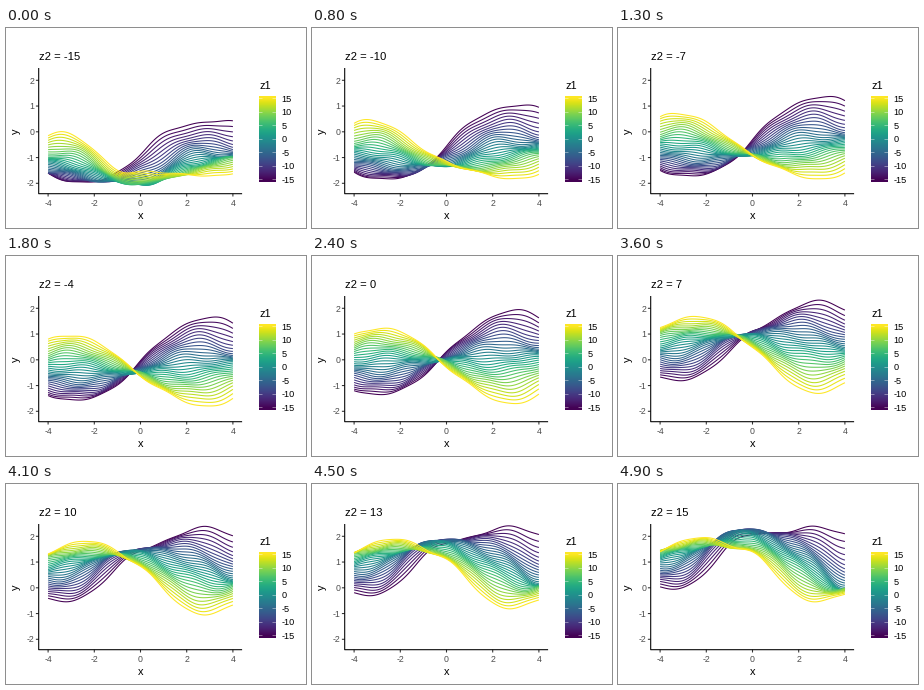
Write a matplotlib script that moves like this. It is 300 by 200 pixels and loops after 5000 ms.

```python
import numpy as np
import matplotlib.pyplot as plt
from matplotlib.animation import FuncAnimation
from matplotlib.collections import LineCollection

plt.rcParams["font.family"] = "Liberation Sans"
W, H, DPI = 300, 200, 100
PX = 72 / DPI  # points per pixel
FRAMES, INTERVAL = 50, 100
GREY, TICK = "#4d4d4d", "#333333"


def bump(x, centre, width):
    return np.exp(-((x - centre) / width) ** 2)


def surface(x, s, t):
    """Height at x for the latent pair s = z1 / 15, t = z2 / 15."""
    low, high = max(-t, 0), max(t, 0)
    level = (0.04 + 0.03 * x + t * (0.77 + 0.84 * bump(x, -0.8, 1.8))
             + 0.25 * t**2 * bump(x, 0.4, 1.1))
    spread = ((-0.24 - 1.55 * np.sin(0.54 * x)) * (1 - 0.3 * t**2)
              - 0.35 * t**2 * bump(x, -0.9, 1.22)
              - 0.2 * t * bump(x, 2.8, 1.4))
    bulge = (0.35 * t - 0.65 * low**2 * bump(x, 0.6, 1)
             - 1.3 * high**2 * bump(x, 4, 1.3))
    skew = 0.8 * bump(x, 4, 1.2) - 0.8 * high * bump(x, -1.2, 1.2)
    ripple = (0.04 * np.sin(2.2 * x + 5 * s + 2 * t)
              + 0.03 * np.sin(3.7 * x - 8 * s + 3 * t))
    return level + spread * s + (bulge + skew * s) * (1 - s**2) + ripple


def to_px(x, y):
    return 134.5 + 23.1 * np.asarray(x), 103.8 - 25.75 * np.asarray(y)


fig = plt.figure(figsize=(W / DPI, H / DPI), dpi=DPI, facecolor="white")
ax = fig.add_axes([0, 0, 1, 1])
ax.set_axis_off()


def label(px, py, text, size=11, color="black", va="baseline", **kw):
    return ax.text(px, py, text, fontsize=size * PX, color=color, va=va, **kw)


def line(xs, ys, color, width=1.07):
    ax.plot(xs, ys, color=color, lw=width * PX, snap=False,
            solid_capstyle="butt")


# Axes
for v in range(-4, 5, 2):
    px, _ = to_px(v, 0)
    line([px, px], [165.7, 168.5], TICK)
    label(px, 178.2, v, 8.8, GREY, ha="center")
for v in range(-2, 3):
    _, py = to_px(0, v)
    line([29.9, 32.7], [py, py], TICK)
    label(28, py + 3.2, v, 8.8, GREY, ha="right")
line([32.7, 32.7, 236.1], [40, 165.7, 165.7], "black")
label(134.5, 191, "x", ha="center")
label(15, 103, "y", ha="right", va="center", rotation=90)

# Colour bar
label(253, 61, "z1")
ax.imshow(np.linspace(1, 0, 20)[:, None], cmap="viridis", aspect="auto",
          extent=(253, 270, 154, 68), interpolation="bilinear")
for v in range(-15, 16, 5):
    py = 111.2 - 2.7 * v
    for left in (253, 266.5):
        line([left, left + 3.5], [py, py], "white", 0.4)
    label(275.7, py + 3.2, v, 9.2)

# Curves
x = np.linspace(-4, 4, 121)
s_values = np.linspace(-1, 1, 31)
title = label(33, 32, "", 11.2)
bundle = LineCollection([], colors=plt.cm.viridis((s_values + 1) / 2),
                        linewidths=1.07 * PX, zorder=3)
ax.add_collection(bundle)
ax.set_xlim(0, W)
ax.set_ylim(H, 0)


def draw(i):
    t = 2 * i / (FRAMES - 1) - 1
    bundle.set_segments([np.column_stack(to_px(x, surface(x, s, t)))
                         for s in s_values])
    title.set_text(f"z2 = {round(15 * t)}")
    return bundle, title


anim = FuncAnimation(fig, draw, frames=FRAMES, interval=INTERVAL,
                     repeat=True, repeat_delay=0)
plt.show()
```
